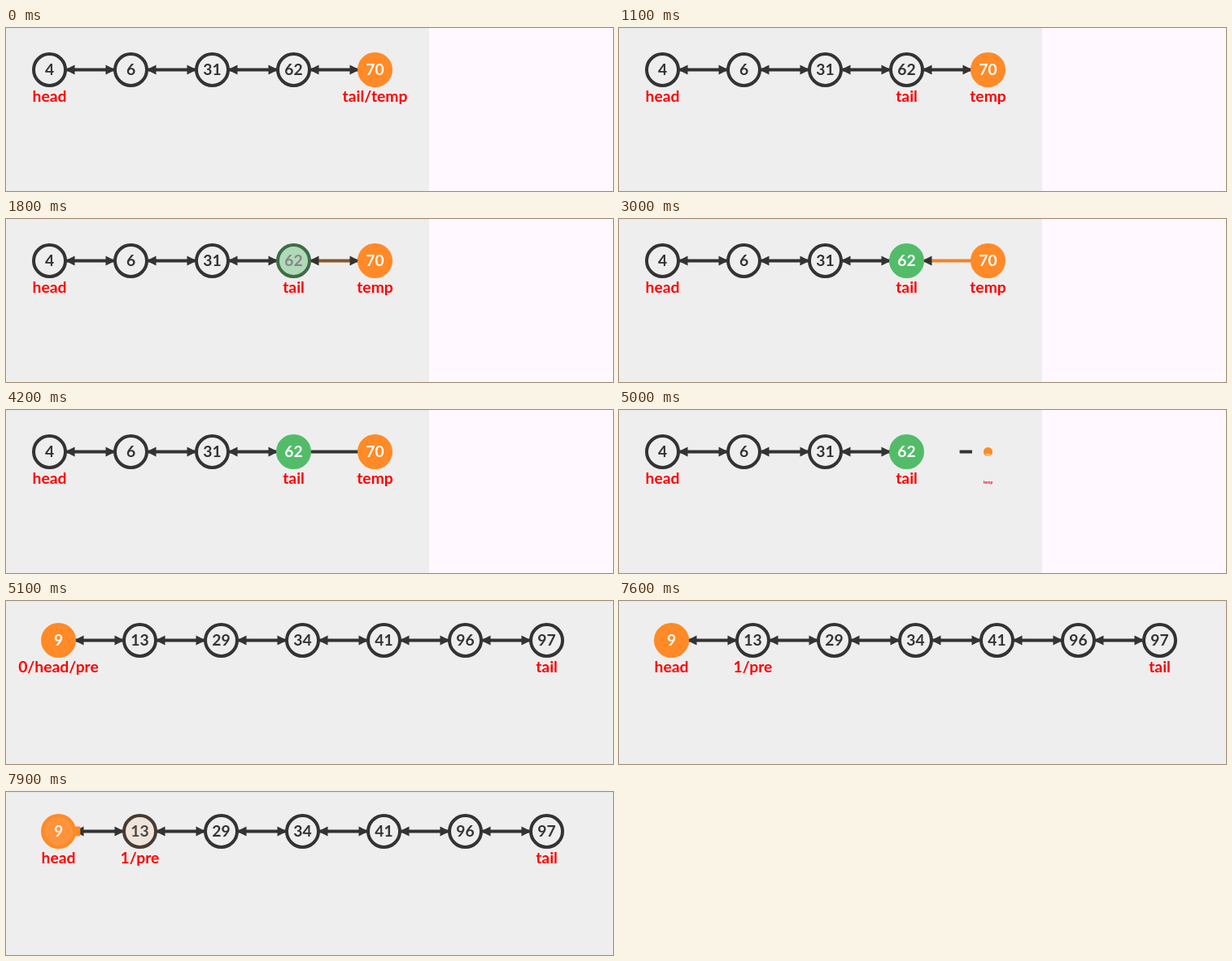
Animation of 746 by 201 pixels, one loop 8000 ms. Source, as an HTML page:

```html
<!DOCTYPE html>
<html lang="en">
<head>
<meta charset="utf-8">
<title>Doubly linked list</title>
<style>
  html, body { margin: 0; width: 100%; height: 100%; overflow: hidden; background: #eee; }
  svg { display: block; width: 746px; height: 201px; }
  text { font-family: Lato, "Open Sans", sans-serif; font-weight: 700; text-anchor: middle; }
</style>
</head>
<body>
<svg id="stage" viewBox="0 0 746 201"></svg>
<script>
const LOOP = 8000, TICK = 100, SECOND_LIST = 5100;
const RADIUS = 19.5, FONT = 19.3;
const DARK = [51, 51, 51], PAPER = [238, 238, 238], WHITE = [255, 255, 255];
const ORANGE = [255, 138, 39], GREEN = [82, 188, 105];

const PLAIN = { fill: PAPER, stroke: DARK, ink: DARK };
const solid = color => ({ fill: color, stroke: color, ink: WHITE });
const outlined = color => ({ fill: PAPER, stroke: color, ink: color });

const stage = document.getElementById('stage');
const rgb = color => `rgb(${color.map(Math.round)})`;
const mix = (a, b, p) => a.map((v, i) => v + (b[i] - v) * p);
const blend = (a, b, p) => ({
  fill: mix(a.fill, b.fill, p),
  stroke: mix(a.stroke, b.stroke, p),
  ink: mix(a.ink, b.ink, p)
});

function progress(time, start, duration) {
  const t = Math.min(1, Math.max(0, (time - start) / duration));
  return t < 0.5 ? 4 * t ** 3 : 1 - 4 * (1 - t) ** 3;
}

const rect = (x, y, w, h, color) =>
  `<rect x="${x}" y="${y}" width="${w}" height="${h}" fill="${color}"/>`;

const text = (x, y, string, color, scale = 1) =>
  `<text x="${x}" y="${y}" font-size="${FONT * scale}" fill="${color}">${string}</text>`;

const line = (x1, x2, y, color, width = 4) =>
  `<line x1="${x1}" x2="${x2}" y1="${y}" y2="${y}" stroke="${rgb(color)}" stroke-width="${width}"/>`;

const arrow = (tip, y, dir) =>
  `<path d="M${tip} ${y}l${-12 * dir} -6v12z" fill="${rgb(DARK)}"/>`;

const label = (x, y, string, scale) => text(x, y + 39.5, string, '#f00', scale);

// x is the centre of the node on the left of the edge
function edge(x, y, { color = DARK, back = true, ahead = true, gone = 0 } = {}) {
  const from = x + 20.5, to = x + 80.5;
  return line(from + (to - from) * gone, to, y, color) +
    (back ? arrow(x + 19, y, -1) : '') +
    (ahead ? arrow(x + 81, y, 1) : '');
}

function node(x, y, value, style = PLAIN, scale = 1) {
  return `<circle cx="${x}" cy="${y}" r="${RADIUS * scale}" fill="${rgb(style.fill)}"` +
    ` stroke="${rgb(style.stroke)}" stroke-width="${4 * scale}"/>` +
    text(x, y + 6.5, value, rgb(style.ink), scale);
}

function removeTail(time) {
  const y = 51.5, at = i => 53.5 + 100 * i;
  const highlight = progress(time, 1100, 1500);
  const restore = progress(time, 2600, 1500);
  const gone = progress(time, 4100, 1500);
  const size = 1 - gone;
  const moved = time >= 1100;
  const lastEdge = {
    color: mix(DARK, ORANGE, highlight - restore),
    back: time < 4200,
    ahead: time < 2600,
    gone
  };

  return rect(520, 0, 226, 201, '#fff9ff') + rect(0, 0, 520, 1, '#e8e8e8') +
    [0, 1, 2].map(i => edge(at(i), y)).join('') +
    edge(at(3), y, lastEdge) +
    [4, 6, 31].map((value, i) => node(at(i), y, value)).join('') +
    node(at(3), y, 62, blend(PLAIN, solid(GREEN), highlight)) +
    node(at(4), y, 70, solid(ORANGE), size) +
    label(at(0), y, 'head') +
    (moved ? label(at(3), y, 'tail') : '') +
    label(at(4), y, moved ? 'temp' : 'tail/temp', size);
}

function walkForward(time) {
  const y = 48.5, at = i => 64.5 + 100 * i;
  const values = [9, 13, 29, 34, 41, 96, 97];
  const step = progress(time, 7580, 1100);
  const stepping = time >= 7600;
  const styles = [
    blend(solid(ORANGE), outlined(ORANGE), step),
    blend(PLAIN, solid(ORANGE), step)
  ];

  return rect(0, 0, 746, 1, '#e8e8e8') +
    values.slice(1).map((_, i) => edge(at(i), y)).join('') +
    (stepping ? line(at(0) + 20.5, at(0) + 21 + 59 * step, y, ORANGE, 12) : '') +
    values.map((value, i) => node(at(i), y, value, styles[i])).join('') +
    label(at(0), y, stepping ? 'head' : '0/head/pre') +
    (stepping ? label(at(1), y, '1/pre') : '') +
    label(at(6), y, 'tail');
}

let shown = -1;
function render(now) {
  const time = Math.floor((now % LOOP) / TICK) * TICK;
  if (time !== shown) {
    shown = time;
    stage.innerHTML = time < SECOND_LIST ? removeTail(time) : walkForward(time);
  }
}

const began = performance.now();
function frame() {
  render(performance.now() - began);
  requestAnimationFrame(frame);
}
frame();
</script>
</body>
</html>
```
